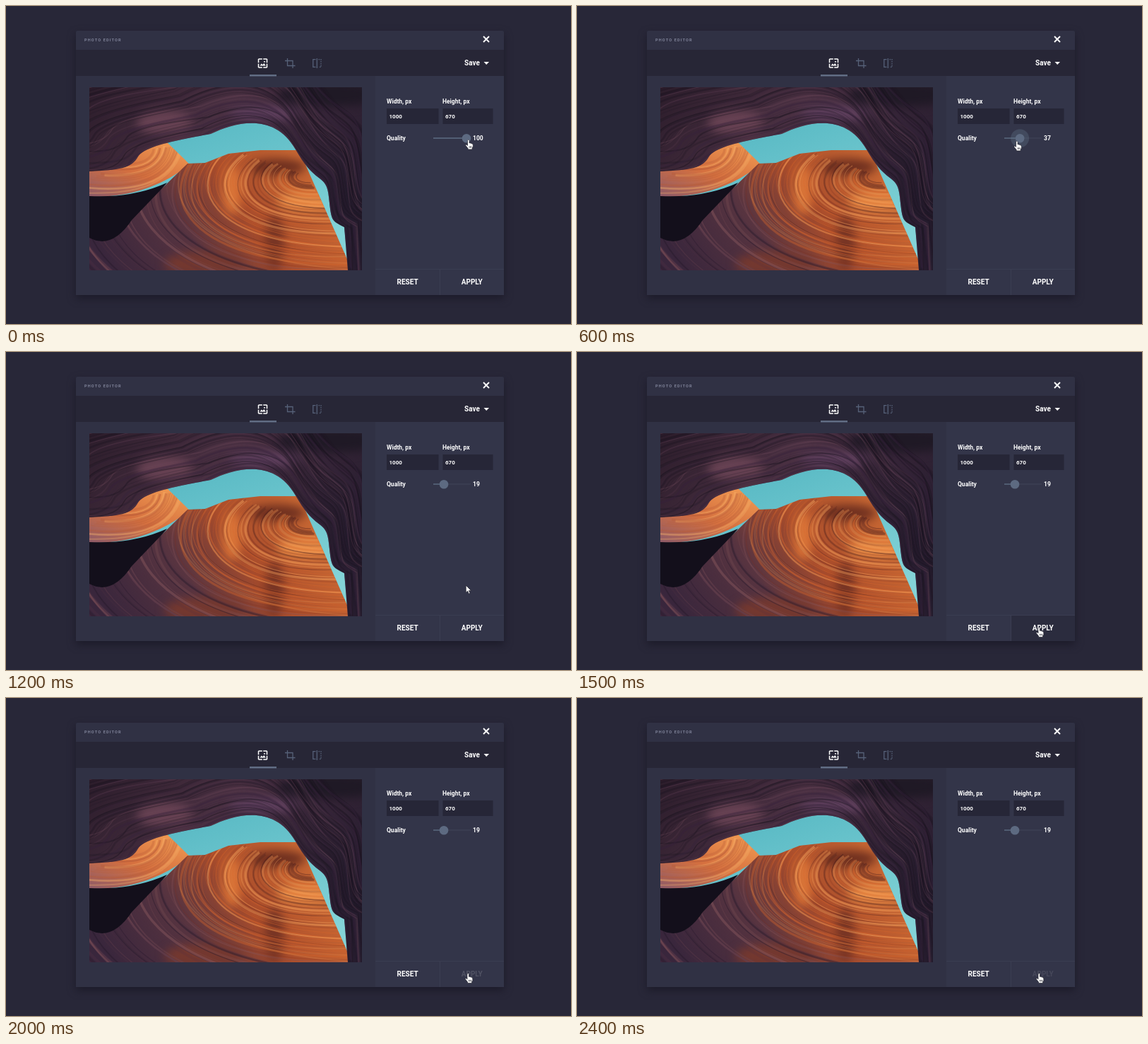
These frames come from a looping animation (800x450 px, 2.5 s). An HTML page:

```html
<!DOCTYPE html>
<html lang="en">
<head>
<meta charset="utf-8">
<title>Photo editor</title>
<style>
html, body { margin: 0; width: 100%; height: 100%; overflow: hidden; background: #282738; }
svg { display: block; width: 800px; height: 450px; }
text { font: 700 8.5px Roboto, Arial, sans-serif; fill: #fff; }
.button { font-size: 10px; }
.line, .echo { fill: none; }
.soft { filter: blur(7px); }
#win { filter: drop-shadow(0 5px 6px #1c1b29); }
</style>
</head>
<body>
<svg viewBox="0 0 800 450">
<defs>
  <linearGradient id="sky" x2=".5" y2="1">
    <stop stop-color="#46aebc"/><stop offset="1" stop-color="#83d3d7"/>
  </linearGradient>
  <linearGradient id="dune" y1="1" x2=".7" y2="0">
    <stop stop-color="#8d5a68"/><stop offset=".5" stop-color="#d5703f"/><stop offset="1" stop-color="#ee9650"/>
  </linearGradient>
  <linearGradient id="wall" y1=".7" y2=".4">
    <stop stop-color="#39263c"/><stop offset=".35" stop-color="#583440"/>
    <stop offset=".6" stop-color="#a94c2b"/><stop offset="1" stop-color="#cf6e35"/>
  </linearGradient>
  <linearGradient id="arch" y2=".5">
    <stop stop-color="#2c1d2b"/><stop offset=".45" stop-color="#4a3042"/><stop offset="1" stop-color="#251c2e"/>
  </linearGradient>
  <clipPath id="frame"><path d="M118 115H504V374H118Z"/></clipPath>
  <clipPath id="duneClip"><use href="#duneShape"/></clipPath>
  <clipPath id="wallClip"><use href="#wallShape"/></clipPath>
  <clipPath id="archClip"><use href="#archShape"/></clipPath>
  <path id="duneShape" d="M118 225L225 190 260 224Q200 272 118 270Z"/>
  <path id="wallShape" d="M118 328Q150 345 178 303L224 255 257 223 282 222 315 209 360 204 415 204 490 374H118Z"/>
  <path id="archShape"/>
</defs>

<path id="win" d="M101 35H703a2 2 0 0 1 2 2V409H99V37a2 2 0 0 1 2-2Z" fill="#303144"/>
<path d="M99 62H705V99H99Z" fill="#272636"/>
<path d="M523 99H705V409H523Z" fill="#333549"/>
<path d="M345 97H383V99.5H345Z" fill="#616d84"/>
<path d="M539 145H612.5V167H539ZM618.5 145H689.5V167H618.5Z" fill="#262637"/>

<text x="111" y="50" style="font-size:5.6px;letter-spacing:1.15px;fill:#80849a">PHOTO EDITOR</text>
<path d="M676 43L684 51M684 43L676 51" stroke="#fff" stroke-width="1.9"/>
<text x="649" y="84.4" class="button">Save</text>
<path d="M676.5 79H684L680.2 83Z" fill="#fff"/>

<rect class="line" x="357.5" y="75" width="12" height="12" stroke="#fff" stroke-width="1.5" stroke-dasharray="5.3 1.4 5.3 0"/>
<path d="M359.5 84.6L361.8 81.6 363.5 83.3 365.3 80.9 367.8 84.6ZM365 78H367V79.5H365Z" fill="#fff"/>
<g class="line" stroke="#566178" stroke-width="1.3">
  <path d="M398.5 74V84.5H409.5M395 77.5H406V88"/>
  <path d="M438.5 75.7H434.8V86.3H438.5M440.3 74V88"/>
  <path d="M442.5 75.7H446V86.3H442.5" stroke-dasharray="1.6 1.3"/>
</g>

<g clip-path="url(#frame)">
  <path d="M118 115H504V374H118Z" fill="url(#sky)"/>
  <use href="#duneShape" fill="url(#dune)"/>
  <g id="duneLines" class="echo" clip-path="url(#duneClip)"/>
  <path d="M118 269Q180 272 228 250L150 345 118 335Z" fill="#130f1b"/>
  <use href="#wallShape" fill="url(#wall)"/>
  <g clip-path="url(#wallClip)">
    <g class="soft">
      <ellipse cx="385" cy="228" rx="40" ry="12" fill="#6d2f1f"/>
      <ellipse cx="425" cy="278" rx="42" ry="14" fill="#e68a45"/>
      <ellipse cx="320" cy="260" rx="14" ry="35" fill="#d97438"/>
      <ellipse cx="380" cy="335" rx="14" ry="40" fill="#763424"/>
      <ellipse cx="280" cy="365" rx="55" ry="18" fill="#74382f"/>
    </g>
    <g id="wallLines" class="echo"/>
  </g>
  <use href="#archShape" fill="url(#arch)"/>
  <g clip-path="url(#archClip)">
    <g class="soft">
      <ellipse cx="225" cy="165" rx="40" ry="18" fill="#664152"/>
      <ellipse cx="365" cy="152" rx="50" ry="10" fill="#614160"/>
      <ellipse cx="460" cy="125" rx="75" ry="18" fill="#1f1925"/>
    </g>
    <g id="archLines" class="echo"/>
  </g>
</g>

<text x="539" y="138.4">Width, px</text>
<text x="618" y="138.4">Height, px</text>
<text x="542.5" y="159" style="font-size:8px">1000</text>
<text x="622" y="159" style="font-size:8px">670</text>
<text x="539" y="190">Quality</text>
<path d="M605 187H658" stroke="#414559"/>
<path id="rail" stroke="#5b6a80" stroke-width="1.4"/>
<circle id="halo" cy="187.3" fill="#68798e"/>
<circle id="thumb" cy="187.3" r="6.3" fill="#5d6a81"/>
<text id="value" x="661" y="190"></text>

<path id="hover" d="M615 373H705V409H615Z" fill="#2b2c3e"/>
<path class="line" d="M523 372.5H705M614.5 373V409" stroke="#3a3d51"/>
<text x="553.5" y="394" class="button">RESET</text>
<text id="apply" x="644.7" y="394" class="button">APPLY</text>

<g id="cursor" fill="#fff" stroke="#20202c" stroke-width=".7" stroke-linejoin="round">
  <path id="arrow" d="M0 0V10.3L2.4 8.1 4.1 12 5.9 11.2 4.2 7.5H7.4Z"/>
  <path id="hand" d="M-1.3 1Q0-1.5 1.2 1V4.6Q2.8 3.9 3.3 5.1 4.8 4.7 5.1 5.8 6.5 5.7 6.5 7.2V9.6L5.3 12V13.6H-.7V12.2L-3.9 8.1Q-4.3 6.6-2.9 6.7L-1.3 8.1ZM1.2 9V11.5M2.7 9V11.5M4.2 9V11.5"/>
</g>
</svg>

<script>
const $ = id => document.getElementById(id);
const set = (id, attrs) => { for (const k in attrs) $(id).setAttribute(k, attrs[k]); };
const mix = (a, b, u) => a + (b - a) * u;
const ramp = (t, from, to) => Math.max(0, Math.min(1, (t - from) / (to - from)));
const ease = (t, from, to) => { const u = ramp(t, from, to); return u * u * (3 - 2 * u); };

let seed = 4127;
const rnd = () => (seed = seed * 16807 % 2147483647) / 2147483647;

// Rock strata: copies of one curve, scaled and slightly turned about a centre
function echo(id, curve, [x, y], from, to, count, colors) {
  for (let i = 0; i < count; i++) {
    const scale = mix(from, to, (i + rnd()) / count);
    const color = colors[Math.floor(rnd() * colors.length)];
    $(id).innerHTML += `<path d="${curve}" stroke="${color}" opacity="${.15 + .35 * rnd()}"
      stroke-width="${(.8 + 3 * rnd()) / scale}"
      transform="translate(${x} ${y}) rotate(${rnd() * 6 - 3}) scale(${scale}) translate(${-x} ${-y})"/>`;
  }
}

const edge = 'M118 234C160 232 178 230 187 213S265 186 290 181C325 164 380 150 410 203S453 235 457 270 460 303 479 313L484 374';
const swirl = 'M330 205C265 250 300 330 480 330';
set('archShape', { d: edge + 'H504V115H118Z' });
echo('duneLines', 'M118 250C180 255 230 245 238 197', [190, 205], .4, 1.3, 14, ['#f6b06a', '#b55a38']);
echo('wallLines', swirl, [425, 240], .1, 1.5, 45, ['#f7a35c', '#4a1e1c', '#d8662c', '#7a2f20']);
echo('wallLines', swirl, [425, 240], 1.5, 3.2, 35, ['#281a2c', '#85545a', '#4b2f42']);
echo('archLines', edge, [400, 340], 1, 2, 60, ['#1b1420', '#704a5c', '#35223a', '#1b1420']);

function draw(now) {
  const t = Math.floor(now % 2500 / 100) * 100;

  const value = Math.round(100 - 81 * ease(t, 150, 800));
  const x = 612.5 + .395 * value;
  const glow = ramp(t, 0, 300) * (1 - ramp(t, 850, 1250));
  set('rail', { d: `M605 187H${x}` });
  set('thumb', { cx: x });
  set('halo', { cx: x, r: 6 + 7 * glow, opacity: .3 * glow });
  $('value').textContent = value;

  const drag = ease(t, 100, 700), go = ease(t, 850, 1400);
  const cx = mix(mix(654.8, 620.3, drag), 654.3, 1 - (1 - go) ** 2);
  const cy = mix(mix(189.3, 191.3, ramp(drag, 0, .5)), 389.8, go);
  const free = cy > 198 && cy < 372;
  set('cursor', { transform: `translate(${cx} ${cy})` });
  set('arrow', { visibility: free ? 'visible' : 'hidden' });
  set('hand', { visibility: free ? 'hidden' : 'visible' });

  const applied = t >= 1900;
  set('hover', { opacity: applied ? 0 : ramp(t, 1200, 1500) });
  set('apply', { opacity: applied ? mix(.16, .09, ramp(t, 1900, 2300)) : 1 });

  requestAnimationFrame(() => draw(performance.now() - start));
}
const start = performance.now();
draw(0);
</script>
</body>
</html>
```
